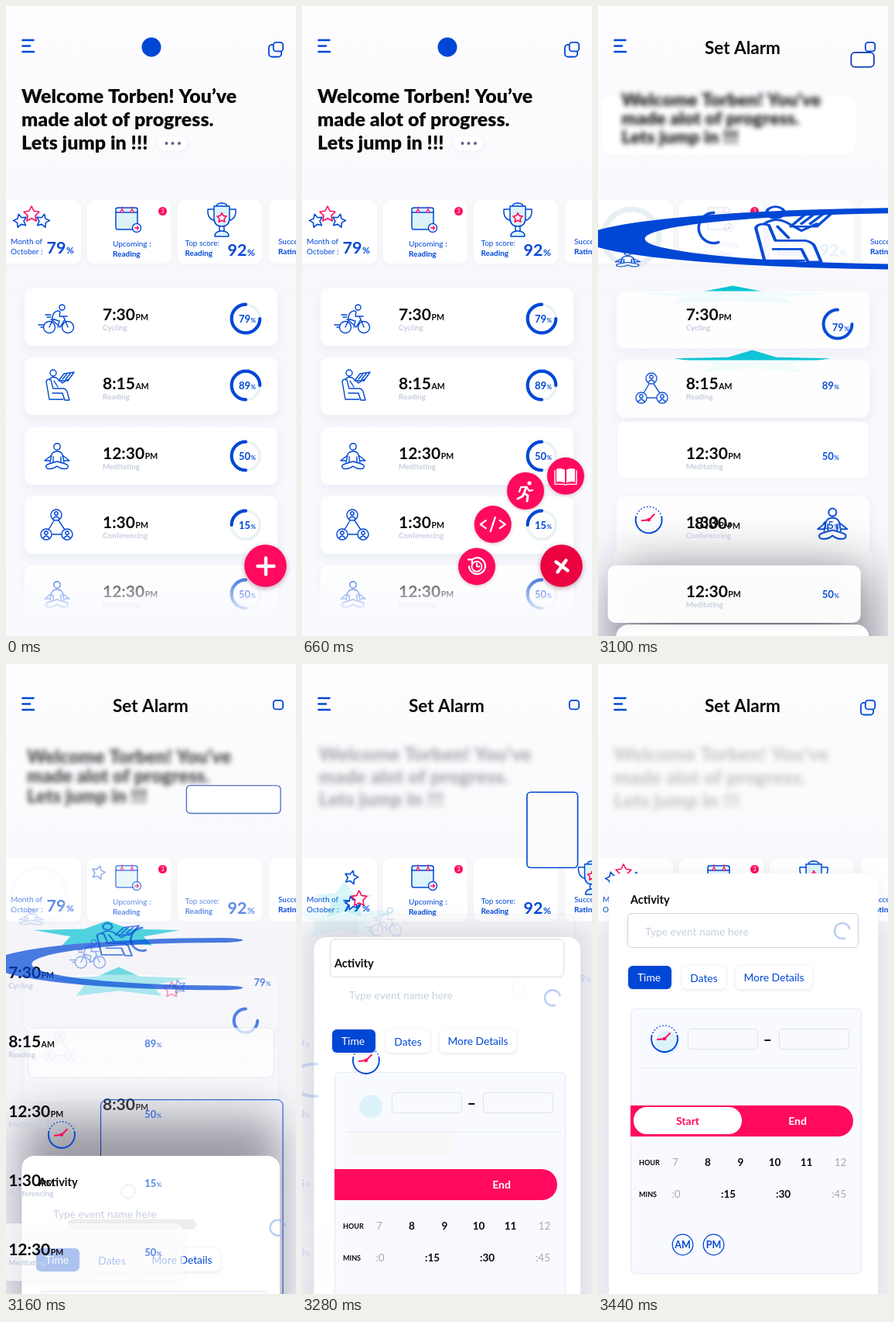
Recreate the animation shown at these times as an HTML page with a canvas. Size 375x812 px, loop 8000 ms.

```html
<!DOCTYPE html>
<html lang="en">
<head>
<meta charset="utf-8">
<title>Set Alarm</title>
<style>
html, body { margin: 0; width: 100%; height: 100%; overflow: hidden; background: #f9f9fd; }
canvas { display: block; width: 375px; height: 812px; }
</style>
</head>
<body>
<canvas id="stage"></canvas>
<script>
const W = 375, H = 812, LOOP = 8000, STEP = 20;
const BLUE = '#0047d6', PINK = '#ff0a5e', INK = '#0a0a0c', PALE = '#c6cfdf', ICE = '#dcf3fa', CYAN = '#00c4d4';
const canvas = document.getElementById('stage');
const ctx = canvas.getContext('2d');
const dpr = window.devicePixelRatio || 1;
canvas.width = W * dpr;
canvas.height = H * dpr;

const clamp = v => Math.max(0, Math.min(1, v));
const lerp = (a, b, p) => a + (b - a) * p;

// cubic-bezier(.25, .1, .25, 1)
function ease(x) {
  if (x <= 0) return 0;
  if (x >= 1) return 1;
  let lo = 0, hi = 1;
  for (let i = 0; i < 30; i++) {
    const s = (lo + hi) / 2;
    if (.75 * s * (1 - s) + s ** 3 < x) lo = s; else hi = s;
  }
  return .3 * lo * (1 - lo) ** 2 + 3 * lo * lo * (1 - lo) + lo ** 3;
}

function group(fn, { x = 0, y = 0, sx = 1, sy = sx, rot = 0, alpha = 1 } = {}) {
  if (alpha <= 0) return;
  ctx.save();
  ctx.translate(x, y);
  ctx.rotate(rot);
  ctx.scale(sx, sy);
  ctx.globalAlpha *= Math.min(1, alpha);
  fn();
  ctx.restore();
}

function shadow(color, blur, dy, fn) {
  ctx.save();
  ctx.shadowColor = color;
  ctx.shadowBlur = blur * dpr;
  ctx.shadowOffsetY = dy * dpr;
  fn();
  ctx.restore();
}

function paint(path, fill, stroke, lw = 1.5) {
  ctx.lineWidth = lw;
  ctx.lineCap = ctx.lineJoin = 'round';
  if (fill) { ctx.fillStyle = fill; ctx.fill(path); }
  if (stroke) { ctx.strokeStyle = stroke; ctx.stroke(path); }
}

function box(x, y, w, h, r, fill, stroke, lw) {
  const path = new Path2D();
  path.roundRect(x, y, Math.max(0, w), Math.max(0, h), r);
  paint(path, fill, stroke, lw);
}

function arc(x, y, r, from, to, color, lw) {
  const path = new Path2D();
  path.arc(x, y, r, from * Math.PI, to * Math.PI);
  paint(path, null, color, lw);
}

function disc(x, y, r, fill, stroke, lw) {
  const path = new Path2D();
  path.arc(x, y, r, 0, 7);
  paint(path, fill, stroke, lw);
}

const line = (d, color, lw) => paint(new Path2D(d), null, color, lw);

function text(s, x, y, size, color, weight = 400, align = 'left') {
  ctx.font = `${weight} ${size}px Lato, "Open Sans", sans-serif`;
  ctx.textAlign = align;
  ctx.fillStyle = color;
  ctx.fillText(s, x, y);
  return ctx.measureText(s).width;
}

// Big figure with a small unit after it
function figure(s, unit, x, y, size, small, color) {
  const w = text(s, x, y, size, color, 700);
  text(unit, x + w + .5, y, small, color, 700);
}

const ring = (x, y, r) => `M${x - r} ${y}a${r} ${r} 0 1 0 ${2 * r} 0a${r} ${r} 0 1 0 ${-2 * r} 0`;

function starPath(r) {
  let d = '';
  for (let i = 0; i < 10; i++) {
    const a = i * Math.PI / 5 - Math.PI / 2, q = i % 2 ? r * .5 : r;
    d += `${i ? 'L' : 'M'}${q * Math.cos(a)} ${q * Math.sin(a)}`;
  }
  return new Path2D(d + 'Z');
}

const icons = {
  bike: ring(-10, 11, 7.5) + ring(14, 11, 7.5) + ring(6.5, -14.5, 3.5) +
    'M-10 11L-6 2L4 11L10 1L14 11M-8 1H-3M10 1L8 -3H13M-6 0C-6 -8 0 -12 4 -9L3 -3L10 -3M-4 1L3 3L1 11' +
    'M-15 -5H-8M-13 -2H-8M-24 8H-17M-21 11H-18',
  reader: ring(-9, -16, 4) +
    'M-14 18L-18 -5Q-17 -9 -12 -7L-9 4H5Q8 5 9 8L12 19H6L3 10H-10M-14 18H4' +
    'M-14 -8Q-9 -13 -4 -9L3 -3L10 -8M-8 -6L-3 2' +
    'M-2 -6L5 -15L18 -17L10 -6ZM3 -8L9 -15M7 -8L13 -15',
  sitter: ring(0, -12, 4.2) +
    'M-9 8L-7 -2Q-5 -6 0 -6Q5 -6 7 -2L9 8M-7 -1L-16 6H-10M7 -1L16 6H10M-5 1V8M5 1V8' +
    'M-13 16Q-17 12 -10 10L0 7L10 10Q17 12 13 16Q6 18 0 13Q-6 18 -13 16Z',
  trio: ring(-1, -13, 7) + ring(-14, 12, 7) + ring(13, 12, 7) +
    ring(-1, -15, 2.2) + ring(-14, 10, 2.2) + ring(13, 10, 2.2) +
    'M-5 -8Q-1 -14 3 -8M-18 17Q-14 11 -10 17M9 17Q13 11 17 17M-4 -6L-11 6M2 -6L10 6M-7 12H6'
};
const icon = (name, pose, lw = 1.4) => group(() => line(icons[name], BLUE, lw), pose);

const rows = [
  { y: 364, time: '7:30', half: 'PM', label: 'Cycling', pct: '79', art: 'bike', arc: [0, 1.5], cy: 403 },
  { y: 453, time: '8:15', half: 'AM', label: 'Reading', pct: '89', art: 'reader', arc: [.5, 2], cy: 489 },
  { y: 543, time: '12:30', half: 'PM', label: 'Meditating', pct: '50', art: 'sitter', arc: [.5, 1.5], cy: 580 },
  { y: 632, time: '1:30', half: 'PM', label: 'Conferencing', pct: '15', art: 'trio', arc: [1, 1.5], cy: 669 },
  { y: 721, time: '12:30', half: 'PM', label: 'Meditating', pct: '50', art: 'sitter', arc: [.5, 1.5], cy: 758 }
];
const headline = ['Welcome Torben! You’ve', 'made alot of progress.', 'Lets jump in !!!'];
const greet = (s, x, y) => text(s, x, y, 25, INK, 900);

function background() {
  const g = ctx.createLinearGradient(0, 0, 0, H);
  g.addColorStop(0, '#fdfdff');
  g.addColorStop(.45, '#f8f8fc');
  g.addColorStop(1, '#f8f9fe');
  ctx.fillStyle = g;
  ctx.fillRect(0, 0, W, H);
  line('M21.5 44H35.5M21.5 51.5H31M21.5 59H36', BLUE, 2.6);
}

const frontSquare = () => box(345.8, 46.8, 12.4, 11.6, 3.5, '#fcfcff', BLUE, 1.8);

const listCard = (x, y) =>
  shadow('rgba(60,80,140,.07)', 14, 5, () => box(x, y, 327, 74, 10, '#fff'));

function rowText(r, x) {
  figure(r.time, r.half, x, r.y + 41, 21, 10.5, INK);
  text(r.label, x, r.y + 54, 9.8, PALE, 700);
}

const percent = (r, x, dy = 0) => figure(r.pct, '%', x, r.cy + 5 + dy, 13, 8, BLUE);

function star(x, y, r, color, rot = 0) {
  group(() => paint(starPath(r), '#fff', color, 1.6), { x, y, rot });
}

function stars(p) {
  star(lerp(325, 18.5, p), lerp(485, 277, p), 9, BLUE, -.25);
  star(lerp(155, 47.5, p), lerp(265, 277, p), 9, BLUE, .25);
  star(lerp(304, 33, p), lerp(495, 268.5, p), 10.5, PINK);
}

function calendar() {
  group(() => {
    box(-14, -14, 28, 28, 2.5, ICE, BLUE, 1.5);
    line('M-14 -8H14', BLUE, 1.5);
    for (const x of [-6, 7]) {
      line(`M${x} -15V-10`, PINK, 1.3);
      disc(x, -9.5, 1.6, '#fff', PINK, 1.2);
    }
    disc(13, 12, 5.5, '#fff', BLUE, 1.4);
    line('M10.5 12H15.5M13.7 10L15.6 12L13.7 14', PINK, 1.3);
  }, { x: 156, y: 274 });
}

function trophy(x) {
  group(() => {
    line('M-10 -13H-18Q-19 0 -8 2M10 -13H18Q19 0 8 2', BLUE, 1.5);
    paint(new Path2D('M-10 -17H10V-2Q10 9 0 9Q-10 9 -10 -2ZM-7 -17Q-6 -21 0 -21Q6 -21 7 -17M-3 9V15M3 9V15M-9 22Q-9 15 0 15Q9 15 9 22Z'), ICE, BLUE, 1.5);
    star(0, -2, 6.5, PINK);
  }, { x, y: 275 });
}

function topCards(p, moving) {
  for (const x of [-12, 105, 222, 340])
    shadow('rgba(60,80,140,.05)', 8, 2, () => box(x, 250, 109, 82, 9, '#fff'));
  group(() => {
    text('Month of', 6, 307, 10, BLUE);
    text('October :', 6, 319.5, 10, BLUE);
    figure('79', '%', 52.5, 319, 21.5, 12, BLUE);
    text('Upcoming :', 138, 310, 10, BLUE);
    text('Reading', 138, 323, 10, BLUE, 700);
    text('Top score:', 231.5, 309, 10, BLUE);
    text('Reading', 231.5, 322, 10, BLUE, 700);
    figure('92', '%', 286.5, 321.5, 21.5, 12, BLUE);
    calendar();
  }, { alpha: moving ? .04 + p * 1.8 : 1 });
  text('Success', 352, 307, 10, BLUE);
  text('Rating', 352, 320, 10, BLUE, 700);
  disc(202.5, 264.5, 5.5, PINK);
  text('3', 202.5, 267.3, 7.5, '#fff', 400, 'center');
  trophy(moving ? lerp(919, 279, p) : 279);
}

const plus = (r, lw) => line(`M${-r} 0H${r}M0 ${-r}V${r}`, '#fff', lw);

const glyphs = [
  () => {
    line('M-10 0A10.5 10.5 0 1 0 -6 -9M-6 -9H-11M-6 -9V-4', '#fff', 2.2);
    arc(0, 0, 6.5, 0, 2, '#fff', 1.8);
    line('M0 -4V0H3.5', '#fff', 2);
  },
  () => line('M-9 -5L-16 0L-9 5M9 -5L16 0L9 5M3 -9L-3 9', '#fff', 2.3),
  () => {
    disc(5, -10, 2.6, '#fff');
    line('M1 -5L-2 3L3 6L2 13M-2 3L-4 7L-10 10', '#fff', 3);
    line('M-8 1L-6 -5L1 -5L5 0L9 -1', '#fff', 2.2);
  },
  () => {
    paint(new Path2D('M-1 -8Q-6 -11 -12 -9V8Q-6 6 -1 9ZM1 -8Q6 -11 12 -9V8Q6 6 1 9Z'), '#fff');
    line('M-14 -7V10.5H-3L0 11.5L3 10.5H14V-7', '#fff', 1.4);
  }
];
const spots = [[198, 723], [224, 655], [277, 601], [342, 577]];

function menu(m, open) {
  const tint = `rgb(${lerp(255, 230, m)},${lerp(10, 0, m)},${lerp(94, 58, m)})`;
  shadow('rgba(90,0,40,.35)', 6, 2, () => disc(335.5, 721.5, 27.3, tint));
  group(() => plus(lerp(10.5, 9, m), 4.4), { x: 336, y: 722, rot: m * Math.PI / 4 });
  if (!open) return;
  spots.forEach(([x, y], i) => {
    const cx = lerp(336.8, x, m), cy = lerp(720, y, m);
    shadow('rgba(90,0,40,.25)', 4, 1, () => disc(cx, cy, 24, PINK));
    group(glyphs[i], { x: cx, y: cy });
  });
}

function home(m, open) {
  background();
  disc(188, 53, 12.5, BLUE);
  box(339.9, 49.9, 16.2, 15.6, 4, null, BLUE, 1.8);
  frontSquare();
  headline.forEach((s, i) => greet(s, 20, 124.5 + 30 * i));
  shadow('rgba(60,80,140,.08)', 5, 1, () => box(196, 168, 38, 18, 9, '#fff'));
  for (const x of [207.5, 215.5, 224]) disc(x, 177, 2, '#5c5c86');
  topCards(1, false);
  stars(1);
  for (const r of rows) {
    listCard(24, r.y);
    icon(r.art, { x: r.art === 'reader' ? 70 : 66, y: r.cy });
    rowText(r, 125);
    arc(310, r.cy, 18.3, 0, 2, '#e9f2f6', 3.6);
    arc(310, r.cy, 18.3, r.arc[0], r.arc[1], BLUE, 4.2);
    percent(r, 301);
  }
  const g = ctx.createLinearGradient(0, 718, 0, 786);
  g.addColorStop(0, 'rgba(249,250,254,0)');
  g.addColorStop(1, 'rgba(249,250,254,1)');
  ctx.fillStyle = g;
  ctx.fillRect(0, 718, W, H - 718);
  menu(m, open);
}

function dial(x, y) {
  arc(x, y, 17, -.08, 1.08, BLUE, 1.9);
  for (let i = 1; i < 11; i++) {
    const a = Math.PI * (1.08 + i * .84 / 11);
    disc(x + 17 * Math.cos(a), y + 17 * Math.sin(a), .9, BLUE);
  }
  line(`M${x - 9} ${y + 1}L${x} ${y}L${x + 7} ${y - 7}`, PINK, 2);
  disc(x, y, 2.3, PINK);
}

function sheetBody() {
  text('Activity', 42, 309, 14.5, INK, 700);
  text('Type event name here', 61, 350, 13.8, PALE);
  const tab = (x, w, fill) =>
    shadow('rgba(60,80,140,.16)', 4, 1, () => box(x, 389, w, 30, 6, fill));
  tab(39, 56, BLUE);
  tab(109, 56, '#fff');
  tab(178, 99, '#fff');
  text('Time', 66, 409, 13.8, '#fff', 400, 'center');
  text('Dates', 137, 410, 13.8, BLUE, 400, 'center');
  text('More Details', 227.5, 409, 13.8, BLUE, 400, 'center');

  box(42.5, 444.5, 298, 341, 6, '#f9faff', '#e3e8f2', 1);
  disc(89, 488, 15, ICE);
  for (const x of [116.5, 234.5]) box(x, 470.5, 90, 26, 4, null, '#dfe3ec', 1);
  line('M216 485H222.5', INK, 1.8);
  line('M58 521H335', '#e4e8ee', 1);
  box(42, 569, 288, 40, [0, 20, 20, 0], PINK);
  text('End', 258, 594, 14, '#fff', 700, 'center');

  text('HOUR', 53, 646, 9, INK, 700);
  text('MINS', 53, 687, 9, INK, 700);
  const pick = (s, x, y, dim) => text(s, x, y, 13.5, dim ? '#a9a9ad' : INK, dim ? 400 : 700, 'center');
  [100, 142, 184.5, 228.5, 269.5, 313.5].forEach((x, i) => pick(i + 7, x, 647, i % 5 === 0));
  [101, 168.5, 239.5, 311.5].forEach((x, i) => pick(':' + (i * 15), x, 688, i % 3 === 0));
  [['AM', 109.5], ['PM', 149.5]].forEach(([s, x]) => {
    disc(x, 748.5, 13.3, null, BLUE, 1.3);
    text(s, x, 753, 12.5, BLUE, 700, 'center');
  });
}

function alarm(p) {
  const at = (a, b) => lerp(a, b, p);
  const slide = -368 * p, left = 1 - p, fade = 1 - 2.4 * p;
  background();
  text('Set Alarm', 187, 62, 22.5, INK, 700, 'center');

  // Greeting sinks into a blur
  group(() => box(at(17, -350), 117.5, 327, 73, 10, '#fff'), { alpha: 1 - 2.2 * p });
  ctx.filter = `blur(${at(3, 3.6) * dpr}px)`;
  headline.forEach((s, i) => group(
    () => greet(s, 0, 0),
    { x: at(30.5, 20), y: at(129, 124.5) + at(23.8, 30) * i, sx: at(.925, 1), alpha: at(.95, .2) }
  ));
  ctx.filter = 'none';

  topCards(p, true);

  // Star fills gather towards the first card
  group(() => {
    group(() => paint(starPath(1), CYAN), { x: at(179, 33), y: at(376, 293), sx: at(139, 20), sy: at(12.5, 28) });
    group(() => paint(starPath(1), CYAN), { x: at(205, 26), y: at(464, 304), sx: at(108, 65), sy: at(15, 32), alpha: at(1, .4) });
  }, { alpha: left });

  // Side shade under the sheet
  const g = ctx.createLinearGradient(0, 328, 0, 350);
  g.addColorStop(0, 'rgba(30,35,60,0)');
  g.addColorStop(1, `rgba(30,35,60,${.05 * p})`);
  ctx.fillStyle = g;
  ctx.fillRect(0, 328, W, H - 328);

  for (const i of [0, 1, 3])
    group(() => listCard(24, rows[i].y + (i < 2 ? 110 * p : 0)), { alpha: 1 - 1.8 * p });
  group(() => percent(rows[0], at(301, 360), at(11, 0)), { alpha: left });
  group(() => arc(310, at(405, 570), at(18.8, 8), 0, 1.5, BLUE, 4), { alpha: left });
  group(() => figure('8:30', 'PM', 125, at(684, 356), 21, 10.5, INK), { alpha: at(1, .4) });

  icon('trio', { x: 70, y: 493, alpha: fade });
  icon('sitter', { x: at(304, 280), y: 667, sx: 1.2, alpha: fade }, 1.7);
  icon('bike', { x: 107, y: at(400, 320), alpha: clamp(p * 3 - .5) * 1.3 * left });
  group(() => arc(at(147, 235), at(279, 508), at(20, 4), .4, 1.5, BLUE, at(3.5, 1.5)), { alpha: left });
  group(() => stars(p), { alpha: 2.5 * p - .4 });

  // Header square trades places with the first card
  group(
    () => box(at(337, 24), at(50, 372), at(20, 327), at(17, 74), 5, '#fff', `rgba(0,50,170,${left})`, at(1.8, .6)),
    { alpha: 2.3 * left });
  group(
    () => box(at(15, 339.9), at(815, 49.9), at(344, 16.2), at(557, 15.6), at(9, 4), p > .8 ? '#fcfcff' : null, BLUE, at(.6, 1.8)),
    { alpha: 3 * p });
  frontSquare();

  // Sheet
  const top = at(814, 270), edge = at(23.5, 14);
  group(() => box(20, 700, 335, 100, 10, '#fff'), { alpha: 1 - 4 * p });
  shadow(`rgba(20,20,35,${at(.58, .05)})`, at(70, 30), at(-72, 0),
    () => box(edge, top, at(350, 362) - edge, 900, [16, 16, 0, 0], '#fff'));
  box(at(24, 38.5), at(542, 321.5), at(327, 298), at(74, 44), at(10, 5), `rgba(255,255,255,${at(1, .2)})`, '#cfd3dc', at(.2, 1));
  group(sheetBody, { y: top - 270 });
  group(() => disc(at(80, 316), at(846, 344), 9, null, '#e3e6ec', 1), { alpha: 3 * left });
  group(() => arc(at(369, 316), at(916, 344), 10, .4, 1.9, '#8fb0ec', 2.6), { alpha: .6 });

  const v = Math.round(lerp(236, 255, clamp((p - .57) / .43)));
  group(() => box(at(97, 46), at(787, 571), at(179, 140), at(2.5, 35), 17, `rgb(${v},${v},${v})`), { alpha: p * 4 - .4 });
  group(() => text('Start', 116, 594, 14, PINK, 700, 'center'), { alpha: (p - .9) * 10 });
  dial(at(65, 86), at(668, 483));

  // Old list leaves to the left, above everything
  group(() => listCard(24 + slide, 721), { alpha: left });
  rows.forEach((r, i) => {
    rowText(r, 125 + slide);
    if (i) group(() => percent(r, 301 + slide), { alpha: left });
  });

  // One progress ring stretches across the stage and shrinks away with it
  group(() => arc(43, 298, 36, 0, 2, '#e5eef2', 7), { alpha: fade });
  icon('sitter', { x: at(39, 20), y: 326, sx: 1, sy: .6, alpha: fade }, 1.8);
  group(() => arc(0, 0, 1, .5, 1.5, BLUE, .19), {
    x: at(448, -58), y: at(291, 580), sx: Math.max(20, at(425, -34)), sy: at(37, 18), alpha: left * 1.05
  });
  icon('reader', { x: at(266, -100), y: at(289, 490), sx: Math.max(.4, at(2.95, -1.4)), sy: Math.max(.4, at(1.9, -.6)), alpha: left }, 1.5);
}

const begin = performance.now();

function frame(now) {
  const t = Math.floor(Math.max(0, now - begin) % LOOP / STEP) * STEP;
  const progress = start => ease((t - start + 17) / 357);
  ctx.setTransform(dpr, 0, 0, dpr, 0, 0);
  if (t < 500) home(0, false);
  else if (t < 3100) home(progress(500), true);
  else alarm(progress(3100));
  requestAnimationFrame(frame);
}
requestAnimationFrame(frame);
</script>
</body>
</html>
```
